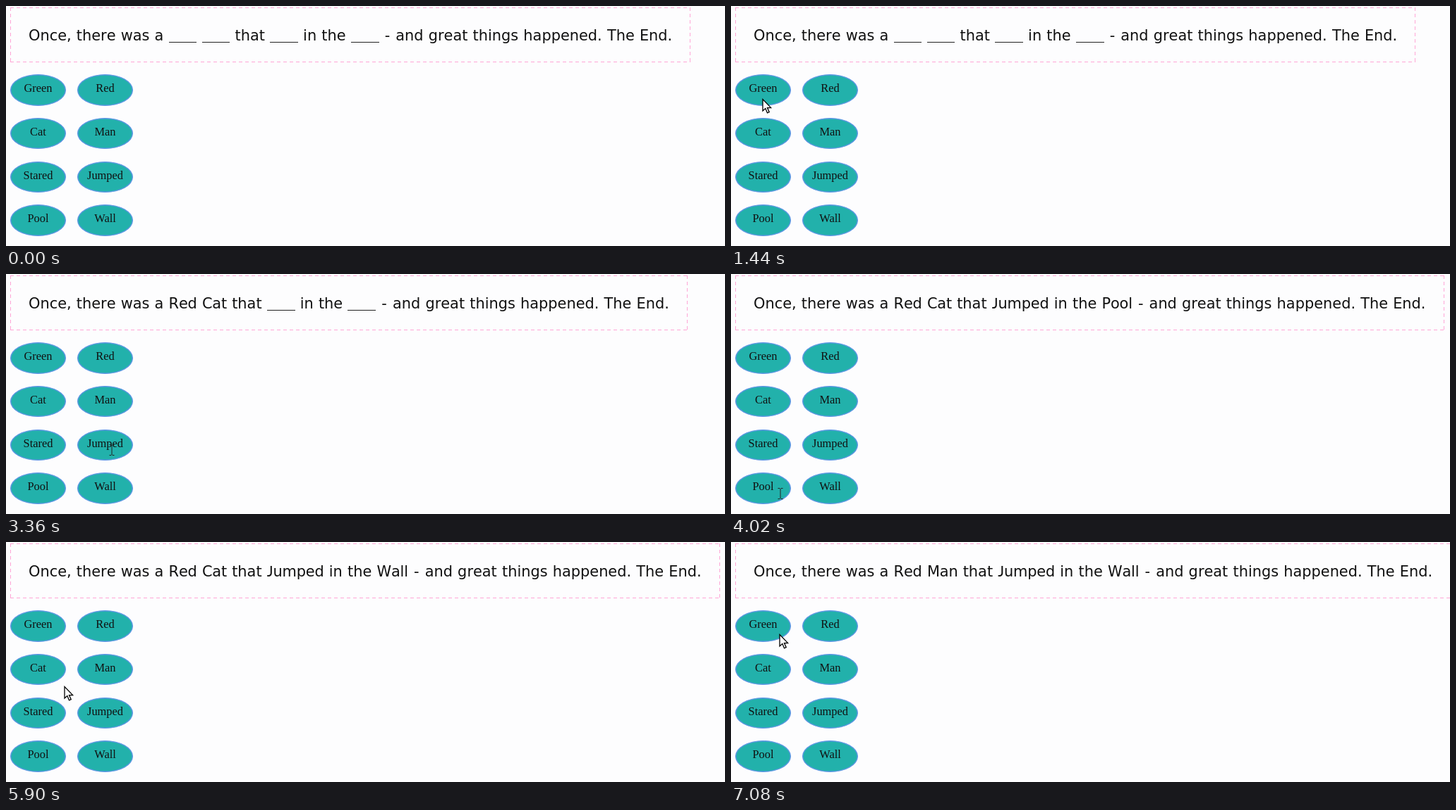
Animation of 1019 by 341 pixels, one loop 7160 ms. Source, as an HTML page:

```html
<!DOCTYPE html>
<html lang="en">
<head>
<meta charset="utf-8">
<title>Story builder</title>
<style>
  html, body { margin: 0; width: 100%; height: 100%; overflow: hidden; background: #fdfdfe; }
  body { position: relative; color: #111; }

  #story {
    position: absolute; left: 6px; top: 2px; height: 78px; box-sizing: border-box;
    padding: 28px 26px 0;
    --across: repeating-linear-gradient(90deg, #ffa6d6 0 5px, transparent 0 9px);
    --down: repeating-linear-gradient(#ffa6d6 0 5px, transparent 0 9px);
    background:
      var(--across) 0 0 / 100% 1px no-repeat, var(--across) 0 100% / 100% 1px no-repeat,
      var(--down) 0 0 / 1px 100% no-repeat, var(--down) 100% 0 / 1px 100% no-repeat;
    font: 20.9px/25px "DejaVu Sans", sans-serif;
    font-kerning: none; word-spacing: .024em; white-space: nowrap;
  }
  #story i { font-family: Lato, sans-serif; font-style: normal; line-height: 0; }
  .slot { letter-spacing: -.007em; }
  .slot:empty {
    display: inline-block; width: 1.907em; height: 4px; box-sizing: border-box;
    border-bottom: 1px solid #222; vertical-align: -3px;
  }
  .dash { margin: 0 .046em; }

  .choice {
    position: absolute; width: 79px; height: 44.6px; box-sizing: border-box;
    border: 1px solid #5f95e6; border-radius: 50%; background: #22b1ab;
    box-shadow: inset 0 0 0 .5px #5f95e6;
    font: 16.4px/37px "Liberation Serif", serif; text-align: center; white-space: nowrap;
  }

  #cursor { position: absolute; left: 0; top: 0; overflow: visible; }
</style>
</head>
<body>
<div id="story">Once, there was a <span class="slot"></span> <span class="slot"></span> that <span class="slot"></span> in the <span class="slot"></span> <span class="dash">-</span> and great things happened. The End.</div>
<svg id="cursor" width="14" height="22">
  <path id="arrow" d="M0 -.5V16L3.8 12.6L6.5 18.8L9.2 17.7L6.5 11.6H11.6Z" fill="#fff" stroke="#000" stroke-width="1.3"/>
  <path id="beam" d="M-3.5 -7.5H-1L0 -6.5L1 -7.5H3.5M0 -6.5V6.5M-3.5 7.5H-1L0 6.5L1 7.5H3.5" fill="none" stroke="#222"/>
</svg>
<script>
  const LOOP = 7160;
  const TOP = 97, ROW = 61.8, LEFT = 6, COL = 95, WIDTH = 79, TEXT = 35;

  // Two choices per row; each row fills one gap in the story
  const choices = ['Green', 'Red', 'Cat', 'Man', 'Stared', 'Jumped', 'Pool', 'Wall'];

  // Pointer stops: time, x, y. Stopping on a label picks it.
  const stops = [
    [400, 1004, 336], [1440, 45, 133], [2060, 55, 188], [2610, 146, 131],
    [3390, 150, 250], [3990, 69, 312], [4540, 150, 312],
    [5110, 52, 277], [5900, 83, 206], [6480, 152, 191], [LOOP, 66, 130]
  ];

  const byId = id => document.getElementById(id);
  const slots = [...document.querySelectorAll('.slot')];
  const cursor = byId('cursor'), arrow = byId('arrow'), beam = byId('beam');

  choices.forEach((word, i) => {
    const el = document.createElement('div');
    el.className = 'choice';
    el.textContent = word;
    el.style.left = LEFT + COL * (i % 2) + 'px';
    el.style.top = TOP + ROW * (i >> 1) + 'px';
    document.body.insertBefore(el, cursor);
  });

  // Index of the label under a point, or -1
  function choiceAt(x, y) {
    const col = Math.floor((x - LEFT) / COL), row = Math.floor((y - TOP) / ROW);
    const inside = (col === 0 || col === 1) && row >= 0 && row < 4 &&
      x - LEFT - col * COL < WIDTH && y - TOP - row * ROW < TEXT;
    return inside ? row * 2 + col : -1;
  }

  function pointerAt(t) {
    const i = Math.max(1, stops.findIndex(s => s[0] > t));
    const [t0, x0, y0] = stops[i - 1], [t1, x1, y1] = stops[i];
    const p = Math.max(0, (t - t0) / (t1 - t0));
    const ease = p * p * (3 - 2 * p);
    return [Math.round(x0 + (x1 - x0) * ease), Math.round(y0 + (y1 - y0) * ease)];
  }

  function fillSlots(t) {
    const words = slots.map(() => '');
    for (const [time, x, y] of stops) {
      const pick = choiceAt(x, y);
      if (t >= time && pick >= 0) words[pick >> 1] = choices[pick];
    }
    slots.forEach((el, i) => {
      if (el.textContent !== words[i]) el.innerHTML = words[i].replace('J', '<i>J</i>');
    });
  }

  function draw(now) {
    const t = now % LOOP;
    const [x, y] = pointerAt(t), overText = choiceAt(x, y) >= 0;
    fillSlots(t);
    cursor.style.display = t < stops[0][0] ? 'none' : 'block';
    cursor.style.transform = `translate(${x}px, ${y}px)`;
    arrow.style.display = overText ? 'none' : 'inline';
    beam.style.display = overText ? 'inline' : 'none';
    requestAnimationFrame(draw);
  }
  draw(performance.now());
</script>
</body>
</html>
```
